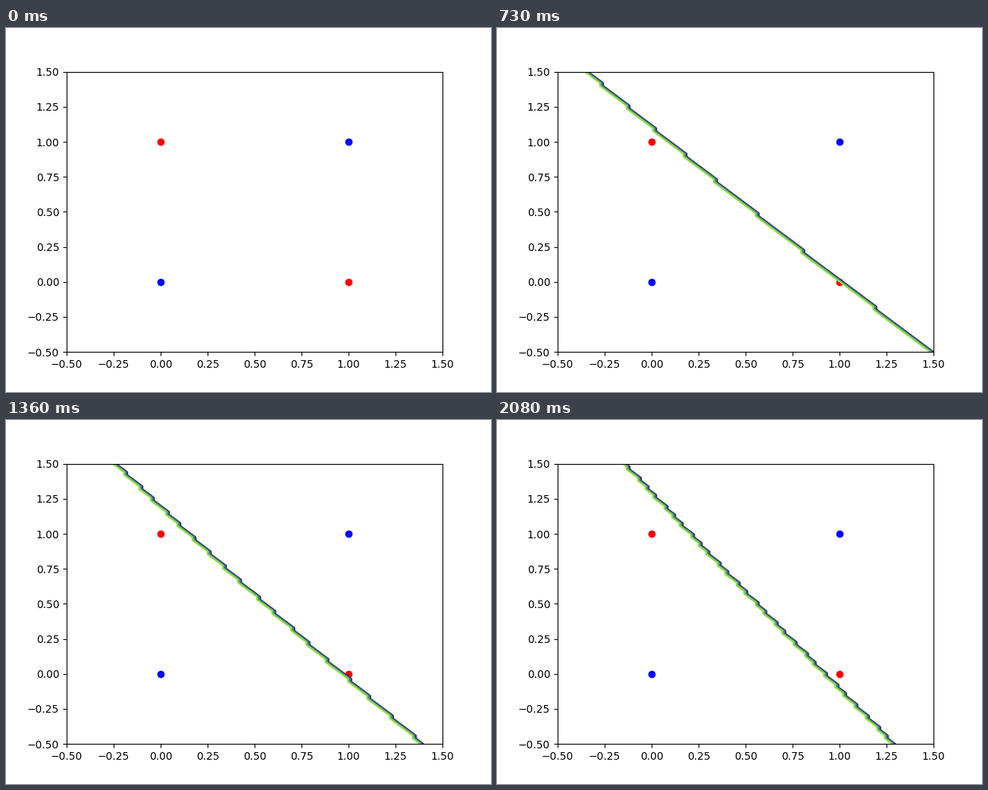
Animation, 640 px wide and 480 px high, one loop 2110 ms. Source, as a matplotlib script:

```python
import numpy as np
import matplotlib.pyplot as plt
from matplotlib.animation import FuncAnimation

TICK = 10            # ms per animation frame
LOOP = 2110          # ms
START, STEP = 160, 30   # ms: first boundary, time per training step
N = 100              # grid points per axis
PIVOT = 54.5         # grid column the boundary turns around

# Boundary in grid units: row + col = level - tilt * d + bend * d**2
STEPS = [0, 8, 19, 34, 46, 56, 64]
LEVEL = [100.98, 100.98, 100.797, 100.965, 101.04, 101.06, 101.08]
TILT = [-0.028, 0.02, 0.0857, 0.181, 0.264, 0.337, 0.395]
BEND = [0.00078, 0.000787, 0.00084, 0.00087, 0.0009, 0.0009, 0.0007]

axis = np.linspace(-0.5, 1.5, N)
col = np.arange(N)
row = col[:, None]
d = col - PIVOT


def classify(step):
    """Predicted class (0 or 1) on the grid after a training step."""
    level, tilt, bend = (np.interp(step, STEPS, p) for p in (LEVEL, TILT, BEND))
    # the boundary sweeps in from the upper right corner and settles
    level += max(0, 90 * np.exp(-0.8 * step) - 0.15)
    return (row + col <= level - tilt * d + bend * d**2).astype(int)


fig, ax = plt.subplots(figsize=(6.4, 4.8), dpi=100)
ax.plot([0, 1], [0, 1], "bo")
ax.plot([0, 1], [1, 0], "ro")
ax.set(xlim=(-0.5, 1.5), ylim=(-0.5, 1.5))


def draw(frame):
    for old in list(ax.collections):
        old.remove()
    step = (frame * TICK - START) // STEP
    if step >= 0:
        ax.contour(axis, axis, classify(step))
    return ax.collections


anim = FuncAnimation(fig, draw, frames=LOOP // TICK, interval=TICK,
                     init_func=lambda: [], repeat=True, repeat_delay=0)
plt.show()
```
